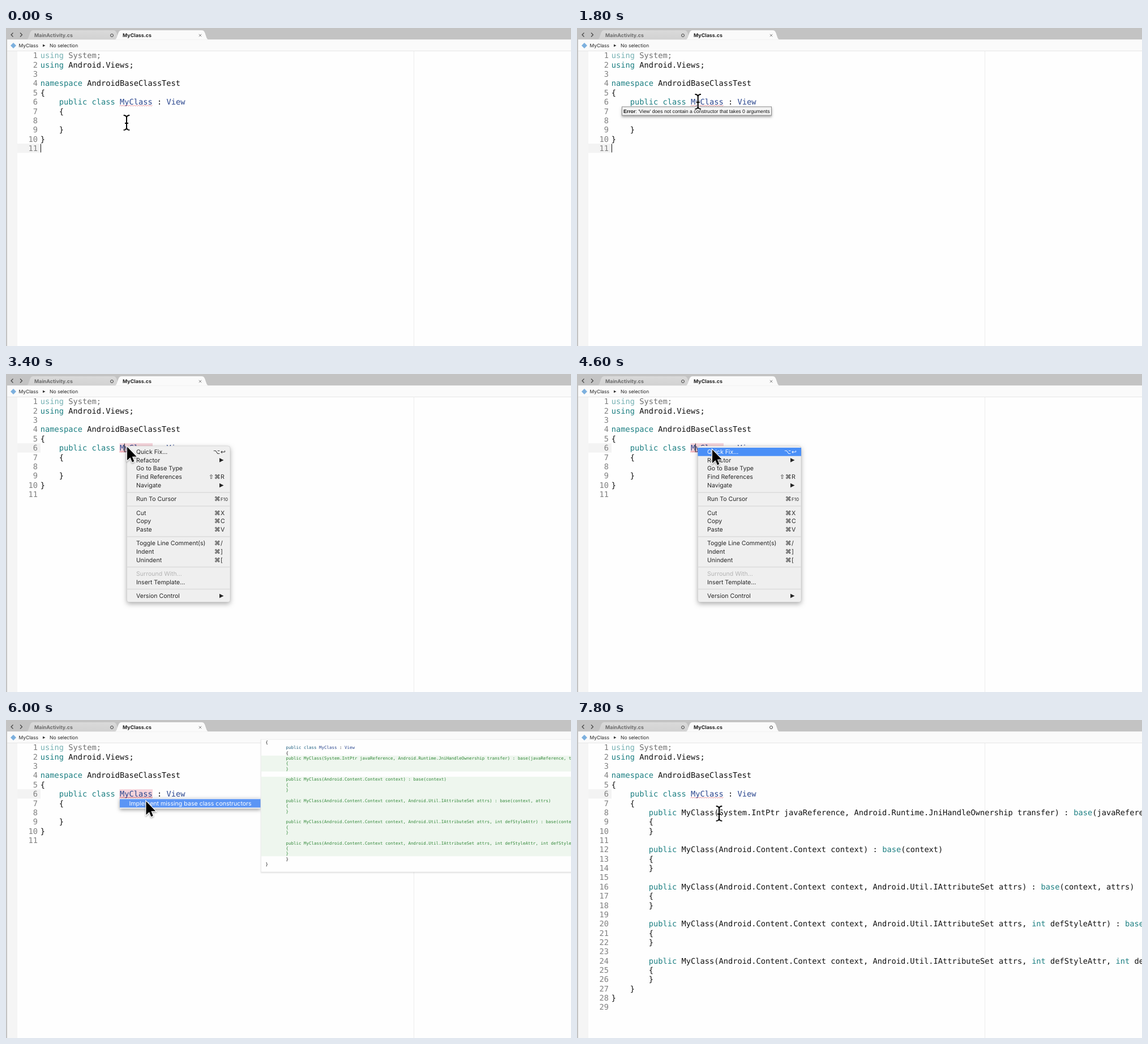
These frames come from a looping animation (998x561 px, 8000 ms). An HTML page with a canvas:

```html
<!DOCTYPE html>
<html lang="en">
<head>
<meta charset="utf-8">
<title>Editor quick fix</title>
<style>
  html, body { margin: 0; width: 100%; height: 100%; overflow: hidden; background: #fefefe; }
  canvas { display: block; }
</style>
</head>
<body>
<canvas id="stage" width="998" height="561"></canvas>
<script>
const ctx = document.getElementById('stage').getContext('2d');
const LOOP = 8000, STEP = 200;
const MONO = '"DejaVu Sans Mono", monospace';
const UI = 'Inter, "DejaVu Sans", sans-serif';
const SYMBOLS = '"DejaVu Sans", sans-serif';
const TEAL = '#1c7f82', NAVY = '#2b478f', INK = '#111';
const SIZE = 13.7, ROW = 16.36, LEFT = 60.8;

// Moments at which the screen switches
const TIP = 1400, MENU = 2800, HOVER = 3600, MENU_END = 4800;
const POPUP = 5000, POPUP_END = 7400, INSERT = 7600;

const params = [
  ['System.IntPtr javaReference, Android.Runtime.JniHandleOwnership transfer', 'javaReference, transfer'],
  ['Android.Content.Context context', 'context'],
  ['Android.Content.Context context, Android.Util.IAttributeSet attrs', 'context, attrs'],
  ['Android.Content.Context context, Android.Util.IAttributeSet attrs, int defStyleAttr', 'context, attrs, defStyleAttr'],
  ['Android.Content.Context context, Android.Util.IAttributeSet attrs, int defStyleAttr, int defStyleRes',
    'context, attrs, defStyleAttr, defStyleRes']
];
const ctors = params.flatMap(([args, pass], i) => [
  ...(i ? [''] : []), `        public MyClass(${args}) : base(${pass})`, '        {', '        }'
]);
const head = ['using System;', 'using Android.Views;', '', 'namespace AndroidBaseClassTest', '{',
  '    public class MyClass : View', '    {'];
const tail = ['    }', '}', ''];
const before = [...head, '', ...tail];
const after = [...head, ...ctors, ...tail];

// Text, centre line, shortcut glyphs as [x, text]
const menuItems = [
  ['Quick Fix...', 137, [[366, '⌥'], [379, '↩']]],
  ['Refactor', 152, 'sub'],
  ['Go to Base Type', 166.6],
  ['Find References', 181.5, [[358, '⇧'], [368, '⌘'], [379, 'R']]],
  ['Navigate', 196.5, 'sub'],
  ['Run To Cursor', 220.5, [[368, '⌘'], [379, 'F10']]],
  ['Cut', 245, [[368, '⌘'], [379, 'X']]],
  ['Copy', 259.5, [[368, '⌘'], [379, 'C']]],
  ['Paste', 274.5, [[368, '⌘'], [379, 'V']]],
  ['Toggle Line Comment(s)', 298.5, [[368, '⌘'], [379, '/']]],
  ['Indent', 313.5, [[368, '⌘'], [379, ']']]],
  ['Unindent', 328, [[368, '⌘'], [379, '[']]],
  ['Surround With...', 352],
  ['Insert Template...', 367],
  ['Version Control', 391.5, 'sub']
];

// Pointer hot spot: time, x, y
const path = [
  [0, 213, 167], [400, 213, 167], [1000, 213.7, 130], [2600, 213.7, 130], [2800, 213, 127],
  [3400, 213, 127], [4200, 238, 132], [5000, 238, 132], [5800, 246.5, 142],
  [7200, 246.5, 142], [7800, 251, 165], [LOOP, 251, 165]
];

function rect(x, y, w, h, fill) {
  ctx.fillStyle = fill;
  ctx.fillRect(x, y, w, h);
}

function text(str, x, y, font, fill, align = 'left') {
  ctx.font = font;
  ctx.fillStyle = fill;
  ctx.textAlign = align;
  ctx.fillText(str, x, y);
}

function poly(points, fill) {
  ctx.beginPath();
  points.forEach(([x, y]) => ctx.lineTo(x, y));
  ctx.closePath();
  if (fill) {
    ctx.fillStyle = fill;
    ctx.fill();
  }
}

function line(points, stroke, width) {
  ctx.beginPath();
  points.forEach(([x, y]) => ctx.lineTo(x, y));
  ctx.strokeStyle = stroke;
  ctx.lineWidth = width;
  ctx.stroke();
}

function ring(x, y) {
  ctx.beginPath();
  ctx.arc(x, y, 2.5, 0, 7);
  ctx.strokeStyle = '#444';
  ctx.lineWidth = 1;
  ctx.stroke();
}

function shadowed(blur, dy, alpha, draw) {
  ctx.save();
  ctx.shadowColor = `rgba(0,0,0,${alpha})`;
  ctx.shadowBlur = blur;
  ctx.shadowOffsetY = dy;
  draw();
  ctx.restore();
}

const baseline = n => 53.4 + ROW * (n - 1);
const rowTop = n => baseline(n) - 13;

function code(str, x, y, size, typed, keyword = TEAL, plain = INK) {
  const font = size + 'px ' + MONO;
  const advance = size * 0.60205;
  let col = 0;
  for (const part of str.split(/\b(using|namespace|public|class|base|int|MyClass|View)\b/)) {
    const isType = /^(MyClass|View)$/.test(part);
    const isWord = /^(using|namespace|public|class|base|int)$/.test(part);
    if (part.trim()) {
      text(part, x + col * advance, y, font, isWord ? keyword : isType && typed ? NAVY : plain);
    }
    col += part.length;
  }
}

function tab(x0, x1, fill) {
  ctx.beginPath();
  ctx.moveTo(x0, 20.5);
  ctx.bezierCurveTo(x0 + 5, 17, x0 + 4, 4, x0 + 11, 4);
  ctx.lineTo(x1 - 11, 4);
  ctx.bezierCurveTo(x1 - 4, 4, x1 - 5, 17, x1, 20.5);
  ctx.fillStyle = fill;
  ctx.fill();
}

function drawFrame(edited) {
  rect(0, 0, 998, 561, '#fefefe');
  rect(2, 41, 18, 520, '#f5f5f5');
  rect(720, 41, 1, 520, '#ededed');
  rect(0, 0, 998, 20.5, '#c3c3c3');
  const grey = ctx.createLinearGradient(0, 4, 0, 20);
  grey.addColorStop(0, '#dadada');
  grey.addColorStop(1, '#d2d2d2');
  tab(37, 201, grey);
  rect(2, 20.5, 996, 20, '#fafafa');
  tab(193, 357, '#fafafa');
  rect(2, 40, 996, 1, '#e6e6e6');
  rect(0, 20, 2, 541, '#c2c2c2');
  line([[12.5, 8.5], [9, 12], [12.5, 15.5]], '#444', 1.2);
  line([[25, 8.5], [28.5, 12], [25, 15.5]], '#444', 1.2);
  text('MainActivity.cs', 50, 16, 'bold 8.9px ' + UI, '#6c6c6c');
  text('MyClass.cs', 206, 16, 'bold 8.9px ' + UI, '#222');
  ring(187, 13);
  if (edited) ring(343, 13);
  else {
    line([[340.8, 10.8], [345.2, 15.2]], '#777', 0.9);
    line([[345.2, 10.8], [340.8, 15.2]], '#777', 0.9);
  }
  poly([[13, 26], [18, 31], [13, 36], [8, 31]], '#7db0de');
  text('MyClass', 22.5, 34.3, '8.5px ' + UI, '#222');
  poly([[65, 28.7], [69.5, 31], [65, 33.3]], '#333');
  text('No selection', 77, 34.3, '8.5px ' + UI, '#222');
}

function drawCode(lines, active, selected, caret) {
  rect(20, rowTop(active), 41, ROW, '#f3f3f3');
  if (selected) rect(200.5, rowTop(6), 58.5, ROW, '#f5d3da');
  lines.forEach((str, i) => {
    const y = baseline(i + 1);
    text(i + 1, 56, y, SIZE + 'px ' + MONO, '#808080', 'right');
    ctx.globalAlpha = i ? 1 : 0.6;
    code(str, LEFT, y, SIZE, i === 5);
    ctx.globalAlpha = 1;
  });
  const wave = Array.from({ length: 30 }, (_, i) => [200.5 + i * 2, i % 2 ? 136 : 138]);
  line(wave, 'rgba(215,60,75,.7)', 0.8);
  if (caret) rect(active === 6 ? 208.8 : 61, rowTop(active) + 0.5, 1, 15, '#111');
}

function drawTip() {
  shadowed(4, 2, 0.35, () => rect(79, 138.5, 265, 16, '#8c8c8c'));
  rect(80, 139.5, 263, 14, '#f4f4f4');
  const font = '8.73px "Liberation Sans", Arial, sans-serif';
  text('Error', 82, 149.8, 'bold ' + font, '#111');
  const w = ctx.measureText('Error').width;
  text(": 'View' does not contain a constructor that takes 0 arguments", 82 + w, 149.8, font, '#111');
}

function drawMenu(hover) {
  ctx.beginPath();
  ctx.roundRect(213.4, 127, 182.6, 275.5, 4);
  shadowed(8, 3, 0.32, () => {
    ctx.fillStyle = '#efefef';
    ctx.fill();
  });
  ctx.strokeStyle = 'rgba(0,0,0,.15)';
  ctx.lineWidth = 0.6;
  ctx.stroke();
  if (hover) rect(213.4, 130, 182.6, 14.7, '#4a8ff7');
  [209, 233, 287, 340.5, 379.5].forEach(y => rect(213.5, y - 0.7, 182, 1.4, '#dadada'));
  menuItems.forEach(([label, y, extra], i) => {
    const fill = hover && !i ? '#fff' : label.startsWith('Surround') ? '#b4b4b4' : '#262626';
    text(label, 230, y + 3.8, '10.55px ' + UI, fill);
    if (extra === 'sub') poly([[377, y - 3.7], [384.5, y], [377, y + 3.7]], fill);
    else if (extra) for (const [x, key] of extra) {
      const symbol = key.charCodeAt(0) > 255;
      const size = key === 'F10' ? 8 : 10.55;
      text(key, x, y + 3.8, size + 'px ' + (symbol ? SYMBOLS : UI), fill);
    }
  });
}

function drawPopup() {
  shadowed(6, 2, 0.4, () => rect(201, 138, 248.5, 18.5, '#f3f3f3'));
  rect(201, 139.5, 248.5, 15, '#5b95f5');
  text('Implement missing base class constructors', 217.5, 150.6, '10.6px ' + UI, '#fff');
}

function drawPreview() {
  const pitch = 9.35, top = 34.7;
  const lines = ['{', '        public class MyClass : View', '        {', ...ctors, '        }', '}'];
  shadowed(2, 1, 0.1, () => rect(450, 34, 560, 234.5, '#e2e2e2'));
  rect(450.7, 34.5, 548, 233.3, '#fefefe');
  rect(450.7, top + 3 * pitch, 548, 3 * pitch, '#eef6ee');
  rect(450.7, top + 7 * pitch, 548, 15 * pitch, '#eef6ee');
  lines.forEach((str, i) => {
    const added = i > 2 && i < 22;
    const green = '#33893a';
    code(str, 458.5, top + i * pitch + 7.3, 7.475, !added,
      added ? green : '#1f5f80', added ? green : INK);
  });
}

function pointerAt(t) {
  const i = path.findIndex(p => p[0] > t);
  const [t0, x0, y0] = path[i - 1], [t1, x1, y1] = path[i];
  const u = (t - t0) / (t1 - t0), e = u * u * (3 - 2 * u);
  return [x0 + (x1 - x0) * e, y0 + (y1 - y0) * e];
}

function drawBeam() {
  ctx.beginPath();
  for (const s of [-1, 1]) {
    ctx.moveTo(-5.3, 13 * s);
    ctx.quadraticCurveTo(-0.5, 13 * s, 0, 9 * s);
    ctx.quadraticCurveTo(0.5, 13 * s, 5.3, 13 * s);
  }
  ctx.moveTo(0, -10);
  ctx.lineTo(0, 10);
  ctx.moveTo(-3, 1);
  ctx.lineTo(3, 1);
  for (const [color, width] of [['rgba(255,255,255,.8)', 4], ['#000', 2]]) {
    ctx.strokeStyle = color;
    ctx.lineWidth = width;
    ctx.stroke();
  }
}

function drawArrow() {
  ctx.translate(1, 1.6);
  poly([[0, 0], [0, 23.6], [5.5, 18.6], [8.9, 26.8], [12.3, 25.4], [8.9, 17.2], [16.7, 17.2]]);
  shadowed(3, 1.5, 0.35, () => {
    ctx.strokeStyle = '#fff';
    ctx.lineWidth = 2.4;
    ctx.stroke();
  });
  ctx.fillStyle = '#000';
  ctx.fill();
}

function caretOn(t) {
  if (t < MENU) return (t + 450) % 1100 < 550;
  return t < POPUP || (t - POPUP + 50) % 1100 < 550;
}

function render(t) {
  const within = (a, b) => t >= a && t < b;
  const edited = t >= INSERT;
  ctx.textRendering = 'geometricPrecision';
  drawFrame(edited);
  drawCode(edited ? after : before, t < MENU ? 11 : 6, within(MENU, INSERT), caretOn(t));
  if (within(TIP, MENU)) drawTip();
  if (within(MENU, MENU_END)) drawMenu(t >= HOVER);
  if (within(POPUP, POPUP_END)) {
    drawPopup();
    drawPreview();
  }
  ctx.save();
  ctx.translate(...pointerAt(t));
  if (within(MENU, INSERT)) drawArrow();
  else drawBeam();
  ctx.restore();
}

const start = performance.now();
function tick() {
  const t = (performance.now() - start) % LOOP;
  render(Math.floor(t / STEP) * STEP);
  requestAnimationFrame(tick);
}
tick();
</script>
</body>
</html>
```
